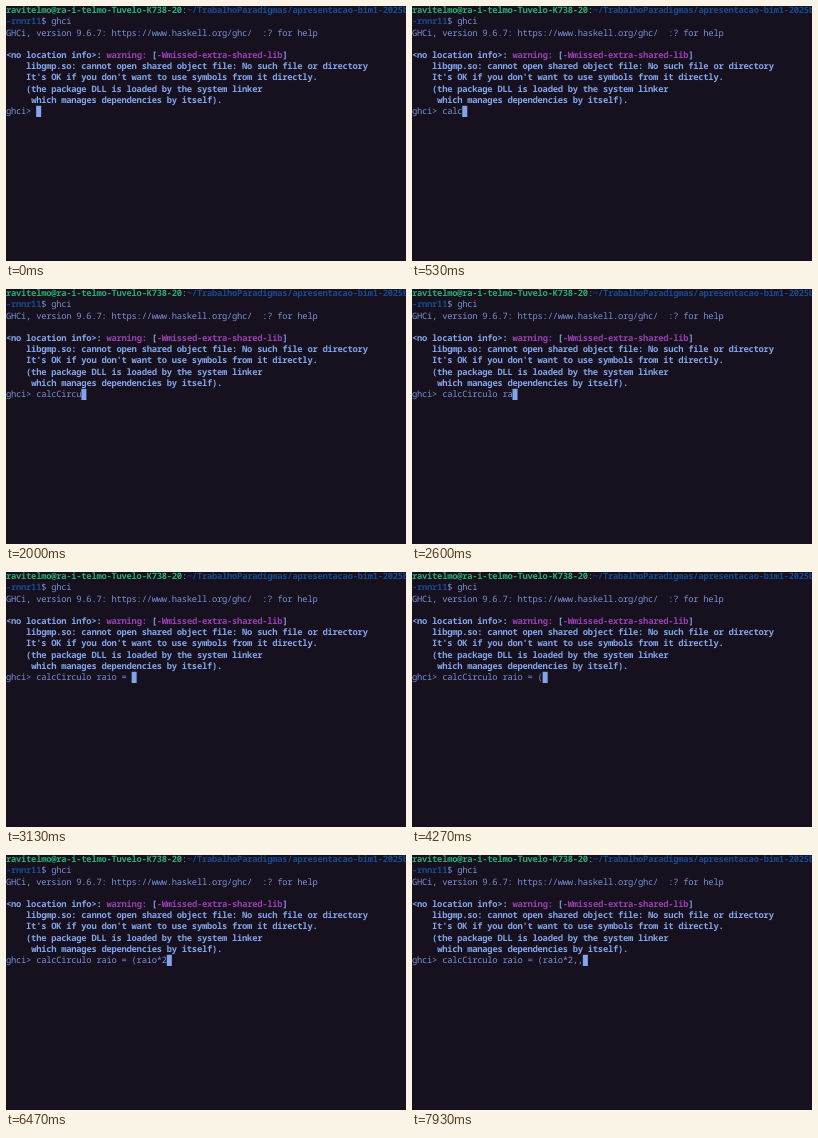
Write an HTML page that moves like this. It is 400 by 255 pixels and loops after 8000 ms.

```html
<!DOCTYPE html>
<html lang="pt">
<head>
<meta charset="utf-8">
<title>ghci</title>
<style>
html, body { margin: 0; width: 100%; height: 100%; overflow: hidden; background: #17111f; }
svg { display: block; width: 100vw; height: 100vh; }
text {
  font: 8.8px "Noto Sans Mono", "DejaVu Sans Mono", monospace;
  letter-spacing: -.255px;
  white-space: pre;
  text-rendering: geometricPrecision;
  fill: #7891d4;
}
.bold, .host, .path, .warn { font-weight: 700; }
.bold { fill: #82a4ea; }
.host { fill: #2bab70; }
.path { fill: #174a8e; }
.warn { fill: #983fb0; }
#cursor { fill: #82a4ea; }
</style>
</head>
<body>
<svg id="term" viewBox="0 0 400 255"></svg>
<script>
const LOOP = 8000, CELL = 5.025, PITCH = 11.2, BASE = 7.2;
const PROMPT = 'ghci> ', INPUT_ROW = 9;
const term = document.getElementById('term');

function add(tag, attrs) {
  const el = document.createElementNS('http://www.w3.org/2000/svg', tag);
  for (const k in attrs) el.setAttribute(k, attrs[k]);
  return term.appendChild(el);
}

function put(row, col, str, cls = '') {
  const el = add('text', { x: col * CELL, y: BASE + row * PITCH, class: cls });
  el.textContent = str;
  return el;
}

// Each row is a list of [text, class] runs.
const rows = [
  [['ravitelmo@ra-i-telmo-Tuvelo-K738-20', 'host'], [':'],
   ['~/TrabalhoParadigmas/apresentacao-bim1-2025b', 'path']],
  [['-rnnr11', 'path'], ['$ ghci']],
  [['GHCi, version 9.6.7: https://www.haskell.org/ghc/  :? for help']],
  [],
  [['<no location info>: ', 'bold'], ['warning: ', 'warn'], ['[', 'bold'],
   ['-Wmissed-extra-shared-lib', 'warn'], [']', 'bold']],
  [['    libgmp.so: cannot open shared object file: No such file or directory', 'bold']],
  [["    It's OK if you don't want to use symbols from it directly.", 'bold']],
  [['    (the package DLL is loaded by the system linker', 'bold']],
  [['     which manages dependencies by itself).', 'bold']]
];

rows.forEach((runs, row) => {
  let col = 0;
  for (const [str, cls] of runs) {
    // Leading blanks become a column offset.
    const body = str.trimStart();
    put(row, col + str.length - body.length, body, cls);
    col += str.length;
  }
});

const input = put(INPUT_ROW, 0, PROMPT);
const cursor = add('rect', { id: 'cursor', y: 99.8, width: CELL, height: 11.2 });

// Key press times; '<' is backspace.
const keys = 'calcCirculo raio = (raio*2,,,<';
const times = [
  200, 330, 470, 530, 1270,
  1530, 1600, 1870, 1930, 2200, 2330,
  2470, 2530, 2600, 2670, 2730,
  2870, 3070, 3130,
  4270, 5400, 5530, 5600, 5730, 6200, 6470,
  7270, 7330, 7470, 7930
];

function typed(t) {
  let s = PROMPT;
  for (let i = 0; i < keys.length && times[i] <= t; i++)
    s = keys[i] === '<' ? s.slice(0, -1) : s + keys[i];
  return s;
}

function draw(t) {
  const s = typed(t);
  input.textContent = s;
  cursor.setAttribute('x', s.length * CELL);
}

const start = performance.now();
function tick(now) {
  draw(Math.max(0, now - start) % LOOP);
  requestAnimationFrame(tick);
}
draw(0);
requestAnimationFrame(tick);
</script>
</body>
</html>
```
